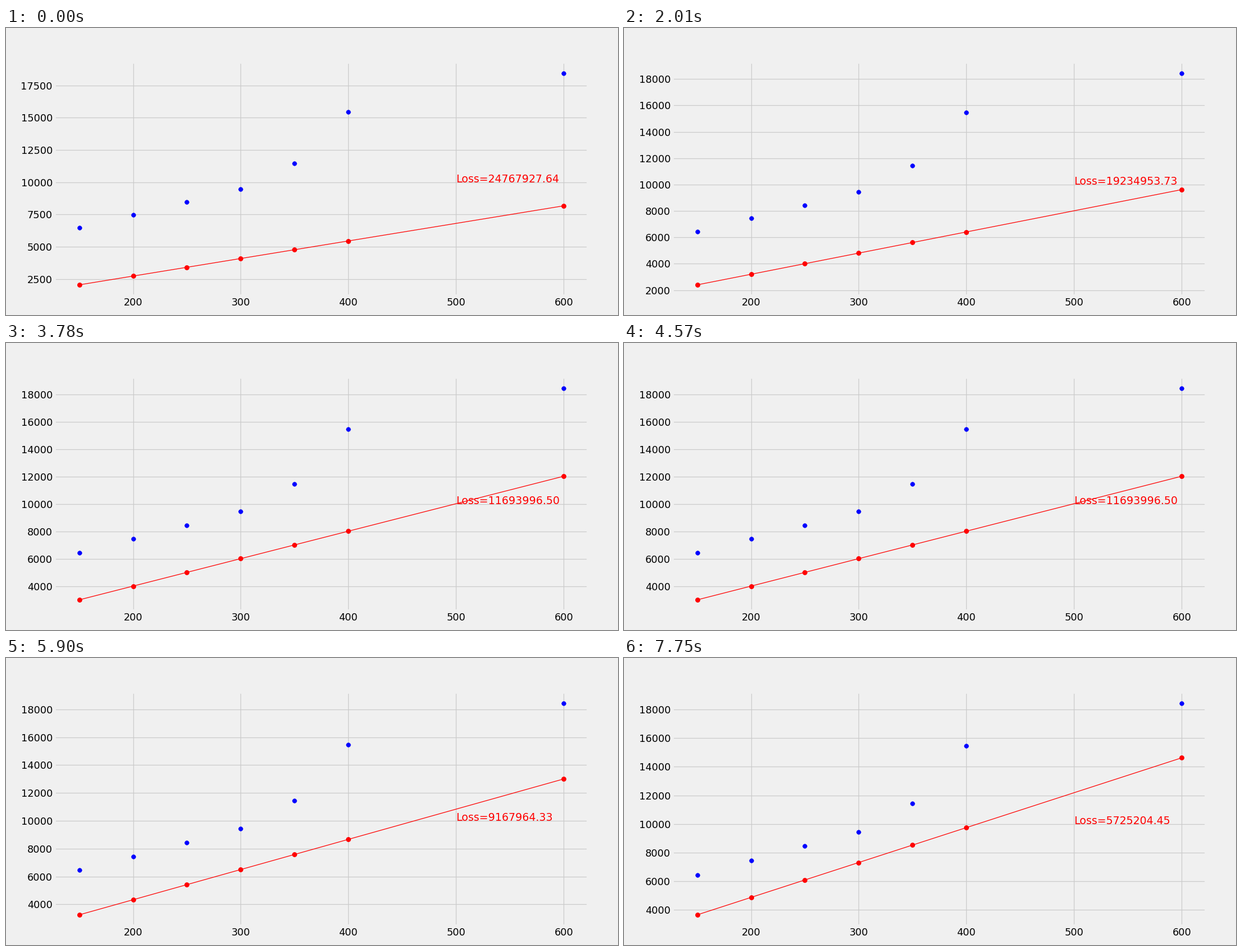
These frames come from a looping animation (1091x513 px, 8000 ms). A matplotlib script:

```python
import matplotlib.pyplot as plt
import numpy as np
from matplotlib.animation import FuncAnimation

WIDTH, HEIGHT, DPI = 1091, 513, 91
# The plot is laid out on a sheet one pixel wider and taller than the stage.
SHEET_W, SHEET_H = WIDTH + 1, HEIGHT + 1
LOOP, INTERVAL = 8000, 32
STARTS = np.array([0, 1220, 2540, 3780, 5100, 6430, 7750])
WARMUP = 4
RATE = 1e-6

area = np.array([150, 200, 250, 300, 350, 400, 600], float)
price = np.array([6450, 7450, 8450, 9450, 11450, 15450, 18450], float)


def descend(steps):
    """Gradient descent on price = w * area + b, starting from zero."""
    w = b = 0.0
    for _ in range(steps):
        error = w * area + b - price
        w -= RATE * np.mean(error * area)
        b -= RATE * np.mean(error)
    fit = w * area + b
    return fit, np.mean((fit - price) ** 2) / 2


def padded(low, high):
    pad = 0.05 * (high - low)
    return low - pad, high + pad


def sheet_rect(left, right, bottom, top):
    """Sheet fractions to stage fractions, both sharing the top left corner."""
    sx, sy = SHEET_W / WIDTH, SHEET_H / HEIGHT
    return [left * sx, 1 - (1 - bottom) * sy, (right - left) * sx, (top - bottom) * sy]


plt.style.use("fivethirtyeight")
plt.rcParams["font.family"] = "DejaVu Sans"

# The tiny surplus keeps the pixel size from rounding down.
fig = plt.figure(figsize=((WIDTH + 1e-3) / DPI, (HEIGHT + 1e-3) / DPI), dpi=DPI)
ax = fig.add_axes(sheet_rect(0.08, 0.95, 0.07, 0.88))
ax.scatter(area, price, color="blue")
line, = ax.plot(area, price, "ro-", linewidth=1)
label = ax.text(500, 10000, "", size=15, color="red")
ax.set_xlim(padded(area.min(), area.max()))


def update(i):
    step = np.count_nonzero(STARTS < (i + 1) * INTERVAL) - 1
    fit, loss = descend(WARMUP + step)
    line.set_ydata(fit)
    label.set_text(f"Loss={loss:.2f}")
    ax.set_ylim(padded(min(fit.min(), price.min()), max(fit.max(), price.max())))
    return line, label


anim = FuncAnimation(fig, update, frames=LOOP // INTERVAL, interval=INTERVAL,
                     init_func=lambda: update(0), repeat=True, repeat_delay=0)
plt.show()
```
